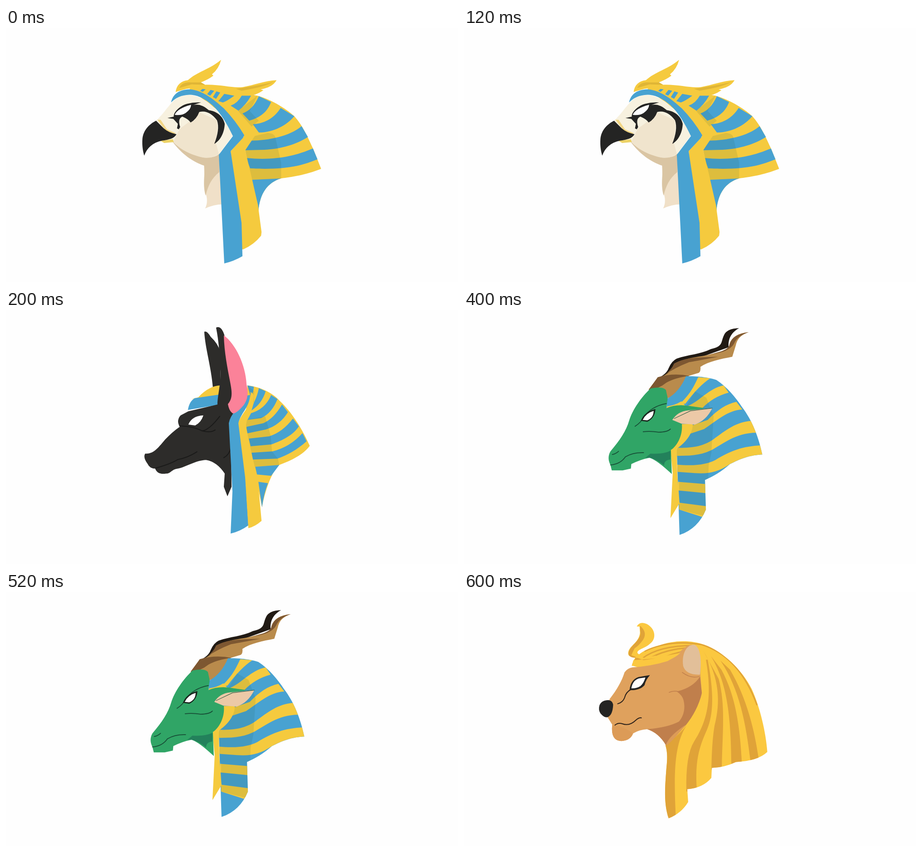
An HTML page with a canvas that plays this animation: 998 px wide and 561 px high, repeating every 800 ms.

```html
<!DOCTYPE html>
<html lang="en">
<head>
<meta charset="utf-8">
<title>Masks</title>
<style>
html, body { margin: 0; width: 100%; height: 100%; overflow: hidden; background: #fefefe; }
canvas { display: block; width: 998px; height: 561px; }
</style>
</head>
<body>
<canvas id="stage" width="998" height="561"></canvas>
<script>
const ctx = document.getElementById('stage').getContext('2d');
const W = 998, H = 561, HOLD = 200, ZOOM = 1.004;
const BLUE = '#48a2d1', GOLD = '#f5ca3e', INK = '#242423', SHADE = 'rgba(30,80,60,.11)';

function fill(color, ...paths) {
  ctx.fillStyle = color;
  for (const d of paths) ctx.fill(new Path2D(d));
}

function line(color, width, ...paths) {
  ctx.strokeStyle = color;
  ctx.lineWidth = width;
  for (const d of paths) ctx.stroke(new Path2D(d));
}

// Draws inside the outline only.
function within(d, draw) {
  ctx.save();
  ctx.clip(new Path2D(d));
  draw();
  ctx.restore();
}

function falcon() {
  // Headcloth
  fill(GOLD, 'M405 135L440 128L555 150C590 160 622 182 636 195C655 216 665 240 678 268L695 311C660 325 630 329 607 332C577 341 560 365 557 405L528 270L545 240Z');
  fill(BLUE,
    'M428 140L434 135L441 136L434 142Z',
    'M444 147L452 137L460 139L451 150Z',
    'M457 153L465 140L473 143L464 157Z',
    'M469 162L482 146L504 150Q488 162 479 165Z',
    'M496 172Q512 166 521 149L541 150Q530 170 513 183Z',
    'M522 189Q545 181 558 151L585 164C577 185 562 198 537 205Z',
    'M545 213C575 211 594 196 606 177L636 195C620 215 590 231 558 231Z',
    'M541 249C580 248 625 240 652 217L666 241C640 257 610 267 570 269L528 270Z',
    'M530 287C590 293 635 284 677 266L687 290C655 303 620 314 539 310Z',
    'M543 335L607 332C577 341 560 365 557 405Z');
  fill(SHADE, 'M548 239L578 232Q594 233 595 245L607 297L607 332L542 335L528 270Z', 'M512 183L555 150L538 184L558 205L542 218Z');

  // Neck and face
  fill('#f0e0c8', 'M437 300L470 278L478 389Q460 389 440 398Q448 382 440 362Z');
  fill('#dac5a3', 'M368 251C390 280 413 295 438 304C440 325 434 345 441 370C446 348 454 332 471 318L472 275L420 265Z');
  fill('#f7f1df', 'M332 205C350 188 356 176 369 163C380 151 398 146 415 150C448 157 474 186 501 237L471 278Q460 288 437 286C410 280 388 270 370 252L350 235Z');
  fill('#f0e4cd', 'M384 223L412 202L428 187L465 203Q470 227 462 248L470 278Q455 289 435 286C410 280 386 270 370 251L377 237Z');
  fill('#f2d685', 'M335 203L342 203L356 224L376 233L360 236Z');
  fill('#ecd266', 'M341 249L369 246L371 252L350 254Z');
  fill(INK,
    'M332 205C318 212 304 225 302 245C301 260 303 272 306 282C312 265 325 253 345 249C361 247 372 244 377 235Q359 231 349 222Z',
    'M357 199L371 196C370 188 382 173 400 168Q415 164 431 165Q420 168 414 171C424 167 437 172 448 182C464 184 479 194 483 212C482 235 471 250 460 256C468 236 471 218 466 204C454 188 440 182 427 186Q421 202 408 209Q404 202 390 196Q379 200 385 219L382 224L378 222L380 212L370 201Z');
  fill('#fefefe', 'M373 192Q379 178 409 170Q409 180 397 188Q388 194 373 192Z');

  // Bands
  fill(GOLD, 'M405 132C445 139 485 170 549 239L528 270L540 320L556 390L564 450L563 458Q548 477 524 488L518 488L496 272L525 240C488 188 455 151 412 140Z');
  fill(BLUE, 'M365 165C369 145 385 136 406 136C434 138 458 157 481 178Q507 205 526 237L523 243L496 272L520 430L522 503Q503 514 482 519L470 280L501 239C488 212 474 188 456 171C436 154 421 148 405 148Q380 149 365 165Z');

  // Winged crest
  fill(GOLD, 'M375 142Q378 119 402 116C421 98 450 92 475 71Q470 91 455 103L458 106Q448 114 430 121L440 126C475 125 500 134 523 131C548 127 570 117 597 116Q588 132 562 136L568 138Q551 150 534 150C510 151 489 145 474 143C455 138 442 133 426 135C405 131 392 137 375 142Z');
  fill('#dfb536', 'M383 133Q390 119 409 121L431 121L440 126L410 125Z', 'M508 135Q551 129 590 120Q568 132 520 139Z');
}

function jackal() {
  const body = '#2d2c2a';
  fill(body, 'M438 49Q444 46 452 60Q469 76 473 93L474 168L457 172C453 125 440 85 438 49Z');
  fill(GOLD, 'M425 193C441 176 458 167 474 167L471 190L410 197Z');
  fill(BLUE, 'M402 221Q405 202 417 195L471 187L467 210Z');

  // Headcloth
  fill(GOLD, 'M533 167C560 170 588 183 603 200C632 227 654 264 670 300C655 320 630 332 603 342C588 355 573 392 565 435L528 255Z');
  fill(BLUE,
    'M533 167L547 170Q547 182 540 190Z',
    'M558 173L573 180Q565 207 542 222L547 205Q555 190 558 173Z',
    'M585 188L599 197C591 217 580 231 563 239L533 243L541 228C565 221 578 205 585 188Z',
    'M609 209L622 226C611 244 594 258 573 264L530 273L531 258L568 250Q591 240 609 209Z',
    'M633 240L646 257C634 276 610 288 585 297L540 301L536 284L581 279Q610 270 633 240Z',
    'M654 272L663 290C643 308 620 321 599 328L545 330L542 315L588 312Q626 303 654 272Z',
    'M550 346L603 342L585 366L554 363Z',
    'M557 379L578 382Q569 405 565 435Z');
  fill(SHADE, 'M532 243L572 235L584 278L587 312L600 328L603 342L549 346L529 258Z', 'M533 167L548 180L547 205L538 190Z');

  // Head
  fill(body, 'M464 40C475 34 483 52 485 70L506 180L498 216L503 228L493 250L497 300L498 390L489 411L481 390L483 361Q466 335 442 331C418 332 399 346 380 350C365 352 365 361 354 361Q335 364 330 350Q318 350 313 339Q303 325 308 317C327 319 339 301 352 286Q368 269 384 258Q376 244 386 233L403 224L467 209C467 188 476 160 473 130C472 100 470 70 464 40Z');
  line('#1a1a19', 2,
    'M384 256Q415 257 433 267Q448 266 472 235',
    'M434 267Q452 272 462 265',
    'M331 349Q364 340 380 330Q402 326 422 313',
    'M497 303Q493 320 481 326');
  fill('#fefefe', 'M403 253Q411 234 436 233Q431 249 418 255Z');

  // Bands
  fill(BLUE, 'M539 188C537 215 520 226 514 247L528 360L535 475Q517 488 496 493L500 400L492 250Q495 235 506 224L524 190Z');
  fill(GOLD, 'M540 181L547 188C547 215 533 230 529 251L541 315L556 378L564 465Q549 478 535 481L528 370L513 250C518 229 542 216 540 181Z');

  // Inner ear
  fill('#fb8299', 'M481 57C507 76 529 122 531 165Q538 192 525 210Q512 226 502 229Q493 225 490 208C501 196 499 181 495 160C489 129 482 95 481 57Z');
}

function antelope() {
  const horn = '#b98b4c', dark = '#7d5731', green = '#30a566';
  // Horns
  fill('#211a14', 'M607 41C592 49 582 63 584 83L520 106L445 150L426 152Q447 143 452 129Q459 113 470 108C495 99 521 99 545 87C573 81 566 72 574 56Q580 42 607 41Z');
  fill(horn, 'M628 50C608 57 603 67 600 78L592 104C567 109 540 114 522 126Q523 139 516 140L496 146C484 170 472 188 450 195L408 176L428 150Q454 144 462 124C484 104 520 106 545 98C570 93 585 90 586 76Q593 53 628 50Z');
  fill(dark,
    'M408 177L428 149Q462 139 498 146Q466 150 447 161Q430 175 408 177Z',
    'M443 144Q459 132 464 119C490 104 520 106 561 104Q520 112 497 116Q466 128 443 144Z',
    'M545 98C570 92 584 88 586 76Q593 54 628 50Q603 58 596 75Q585 94 545 98Z');

  // Headcloth
  const cloth = 'M490 147C520 146 545 151 557 155C580 170 600 194 613 214C636 244 650 281 658 319C622 321 602 333 587 340C568 357 550 367 532 375L534 440Q517 482 476 496L470 310L480 255L447 220L449 196Q476 181 490 147Z';
  fill(BLUE, cloth);
  within(cloth, () => {
    fill(GOLD,
      'M517 149L544 151Q518 168 489 207L475 209C500 186 507 170 517 149Z',
      'M446 221L449 213Q465 211 480 202L490 213Z',
      'M573 167L584 183Q550 192 526 217L495 212C520 202 541 173 573 167Z',
      'M601 203L614 220C582 221 555 247 530 263L500 273L503 255L538 243C560 220 579 208 601 203Z',
      'M634 245L648 271C600 270 570 297 545 310C520 322 495 322 468 322V304C510 306 532 298 550 286C580 264 600 248 634 245Z',
      'M655 299L660 319C622 321 602 333 587 340C560 358 540 362 510 360L468 357V341C510 345 535 341 555 331C590 310 615 301 655 299Z',
      'M473 379L534 384V404L473 398Z',
      'M475 425L536 433V447L525 456L475 440Z');
    fill(SHADE, 'M468 250L510 180L535 194L551 235L546 315L540 343L536 456L475 440V379L468 357Z');
  });
  fill(GOLD, 'M479 252L505 251C506 272 490 292 470 306L471 360L476 426L456 459L461 360L456 310Q480 280 479 252Z');

  // Head
  fill(green, 'M412 174Q438 168 446 177L450 195L447 217Q466 209 488 211L532 217L485 225L462 242L481 251C484 280 468 302 457 309L459 362Q426 331 410 326Q390 330 370 340L369 350L351 354L327 354L324 342Q316 326 324 312C345 288 359 266 365 245C373 219 393 192 412 174Z');
  fill('#23815b', 'M401 326L412 317Q439 319 456 311V330Q442 331 442 343Q425 329 410 326Z');
  fill('#ecc9a7', 'M460 243Q472 224 495 222L548 217Q535 244 510 253L480 251Z');
  line('#174c35', 1.7,
    'M378 257Q391 249 397 237Q414 213 447 207',
    'M396 269Q412 267 430 270Q449 270 456 263',
    'M324 342Q346 340 357 324Q374 314 397 315',
    'M328 319Q335 318 342 312');
  line('#174c35', 1, 'M464 240L500 223L548 217');
  fill('#17251c', 'M391 245Q398 225 423 219Q422 239 405 247Z');
  fill('#fefefe', 'M395 243Q402 228 419 223Q419 238 405 244Z');
}

function lioness() {
  const skin = '#dfa15d', gold = '#fbc840', deep = '#e0a338', shadow = '#c07f4c';
  // Mane
  const mane = 'M371 163C376 140 400 127 430 119C462 107 500 106 530 117C572 132 614 173 635 215C653 255 666 310 669 353Q648 373 600 375Q575 387 547 388L546 410Q528 432 493 435L495 463Q480 488 452 499C441 466 444 430 447 390C450 365 449 352 445 338L505 200Z';
  fill(gold, mane);
  within(mane, () => {
    fill(deep,
      'M442 336Q469 323 491 295C464 338 463 400 468 500H440Z',
      'M534 150C550 240 534 290 508 330Q489 360 491 440L514 435C510 375 518 345 536 305C552 268 551 220 538 150Z',
      'M528 130C565 190 566 245 553 295Q547 330 546 392L569 386C570 315 578 250 562 192Z',
      'M545 142C580 200 589 270 590 380L613 376C609 300 600 230 568 172Z',
      'M566 152C608 215 622 290 632 374L650 368C641 305 624 235 587 172Z');
    line(deep, 3,
      'M393 148Q430 119 507 119',
      'M407 149Q445 126 499 124',
      'M432 150Q460 135 494 130',
      'M400 131Q455 105 525 117Q607 143 646 249');
  });

  // Head
  fill(skin, 'M372 167Q415 164 450 153C471 143 486 118 502 117C517 119 524 145 522 182L525 225C516 265 475 306 446 338Q430 311 405 303Q388 304 374 312Q369 327 348 329Q324 329 328 293L318 277L322 237C338 217 350 195 355 178Q361 169 372 167Z');
  fill(shadow, 'M521 187L525 223C519 250 506 274 490 294L446 338Q430 311 405 303Q451 299 475 286Q491 266 485 240Q483 229 470 220Q506 211 521 187Z');
  fill('#dc9b57', 'M446 338Q452 318 490 293Q470 319 450 337Z', 'M328 294Q355 297 373 312Q368 328 348 329Q324 328 328 294Z');
  fill(gold, 'M371 164Q374 151 387 149L427 145L478 135Q456 155 423 157Q397 157 371 164Z');
  fill('#e2bf99', 'M484 164C480 138 491 117 508 117C522 122 525 151 521 183Q490 184 484 164Z');
  line(shadow, 1.5, 'M482 178Q501 192 519 187', 'M453 222Q465 216 484 223');

  // Cobra
  fill(gold, 'M382 77Q388 65 403 71C422 80 427 103 411 115C401 125 380 128 384 136L397 146L424 141L428 148L373 154L380 144Q364 145 363 137C363 119 386 115 389 91L388 77Z');
  fill(deep, 'M389 75Q406 90 396 106Q387 119 377 125L370 140L380 144L377 151L424 147L397 151L384 146Q363 146 364 136C365 121 386 112 390 94Z');

  // Features
  fill(INK, 'M300 250Q305 239 320 239Q328 240 330 249Q329 271 319 276Q311 279 302 268Q297 260 300 250Z', 'M366 217Q368 194 386 188L411 184Q402 194 399 206Q389 218 366 217Z');
  fill('#fefefe', 'M370 213Q373 195 387 191L401 189Q397 202 390 208Q381 214 370 213Z');
  line('#2c211a', 2, 'M370 215Q358 221 355 234Q351 244 340 247', 'M334 294Q341 288 350 291Q366 297 380 283Q387 277 392 278');
}

const scenes = [falcon, jackal, antelope, lioness];

function tick(now) {
  ctx.resetTransform();
  ctx.fillStyle = '#fefefe';
  ctx.fillRect(0, 0, W, H);
  ctx.translate(W / 2, H / 2);
  ctx.scale(ZOOM, ZOOM);
  ctx.translate(-W / 2, -H / 2);
  ctx.lineCap = ctx.lineJoin = 'round';
  scenes[Math.floor(now / HOLD) % scenes.length]();
  requestAnimationFrame(tick);
}

tick(0);
</script>
</body>
</html>
```
